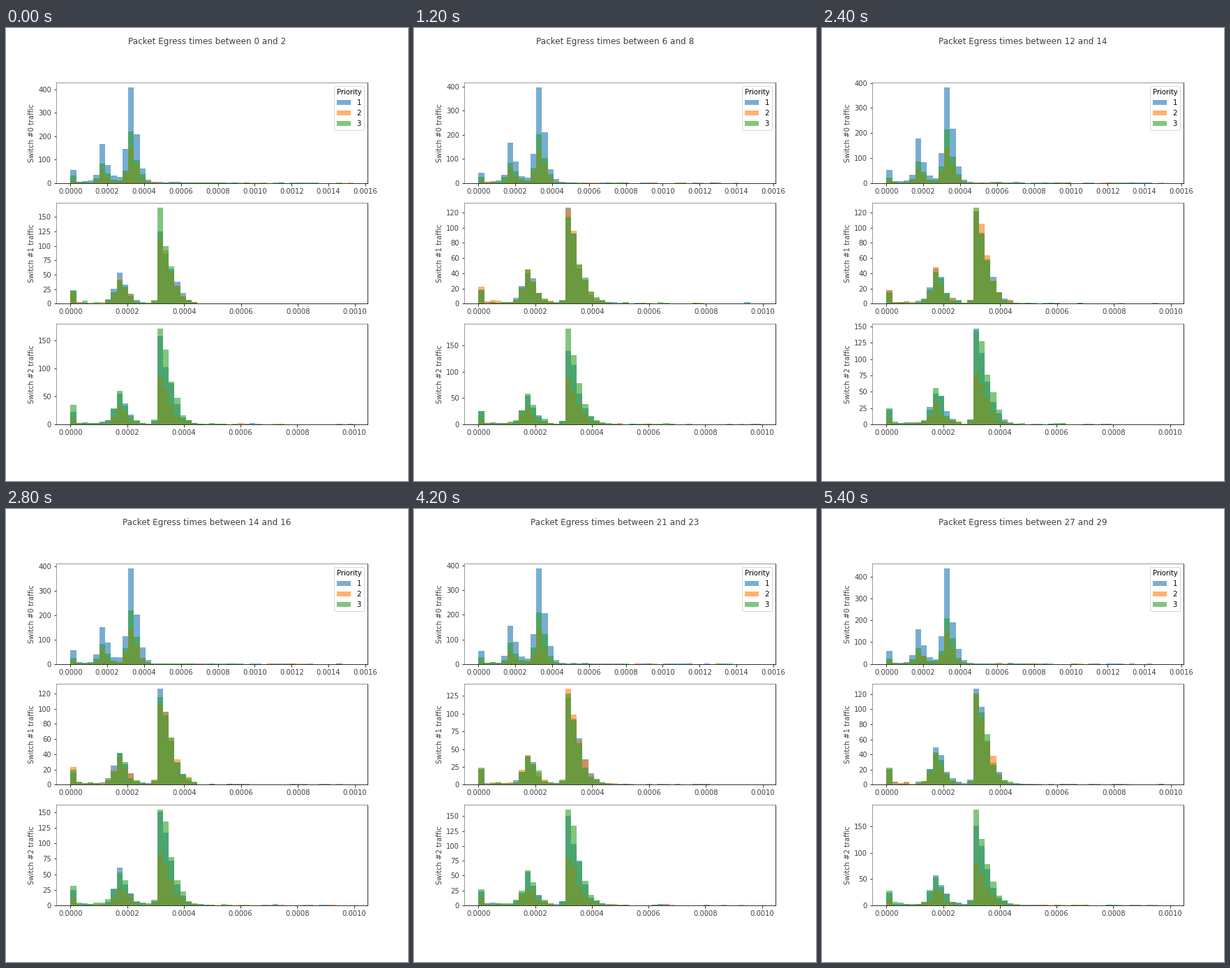
Recreate the animation shown at these times as a matplotlib script. Size 576x648 px, loop 5.6 s.

```python
import numpy as np
import matplotlib.pyplot as plt
from matplotlib.animation import FuncAnimation

INK, SOFT = "#404040", "#808080"
plt.rcParams.update({
    "font.family": "DejaVu Sans",
    "font.size": 10,
    "figure.subplot.bottom": 0.125,
    "text.color": INK,
    "axes.labelcolor": INK,
    "xtick.labelcolor": INK,
    "ytick.labelcolor": INK,
})

STEPS, INTERVAL, BINS = 28, 200, 49
COLORS = ("#1f77b4", "#ff7f0e", "#2ca02c")

# Per switch: longest delay, and packets per priority in the idle bin and in
# two humps given as (peak bin, rise, fall, heights). "busiest" holds the
# tallest bar at the steps in KEY_STEPS.
KEY_STEPS = (0, 4, 8, 12, 17, 21, 27)
SWITCHES = [
    dict(limit=0.001536, idle=(50, 10, 26),
         first=(5, 0.74, 1.3, (156, 50, 82)),
         main=(10, 0.88, 1.3, (404, 138, 206)),
         busiest=(410, 405, 390, 383, 408, 390, 438)),
    dict(limit=0.0009954, idle=(20, 19, 21),
         first=(8, 1.15, 1.8, (45, 40, 42)),
         main=(15, 0.45, 2.4, (121, 119, 122)),
         busiest=(166, 132, 120, 126, 125, 135, 127)),
    dict(limit=0.000999, idle=(25, 11, 29),
         first=(8, 1.15, 1.8, (53, 31, 53)),
         main=(15, 0.45, 2.3, (147, 85, 170)),
         busiest=(171, 183, 180, 144, 168, 161, 182)),
]


def hump(peak, rise, fall, heights):
    d = np.arange(BINS) - peak
    shape = np.exp(-(np.abs(d) / np.where(d < 0, rise, fall)) ** 1.5)
    return np.outer(heights, shape)


def mean_counts(switch):
    """Expected packets per window, by priority and bin."""
    decay = np.exp(-np.arange(BINS) / 14)
    tail = np.outer(switch["main"][3], 0.02 * decay)
    mean = hump(*switch["first"]) + hump(*switch["main"]) + tail
    mean[:, 0] = switch["idle"]
    return mean


def simulate(switch, rng):
    """Packets in overlapping two-second windows, one window per step."""
    mean = mean_counts(switch) / 2
    raw = rng.poisson(mean, (STEPS + 1,) + mean.shape)
    seconds = np.rint(mean + 0.6 * (raw - mean))
    windows = seconds[:-1] + seconds[1:]
    tops = np.interp(np.arange(STEPS), KEY_STEPS, switch["busiest"])
    for window, top in zip(windows, tops.round()):
        column = window[:, switch["main"][0]]
        column[column.argmax()] = top
    return windows


rng = np.random.default_rng(4)
counts = [simulate(switch, rng) for switch in SWITCHES]

fig, axes = plt.subplots(3, 1, figsize=(8, 9), dpi=72)
title = fig.suptitle("")
bars = []
for i, (ax, switch) in enumerate(zip(axes, SWITCHES)):
    limit = switch["limit"]
    edges = np.linspace(0, limit, BINS + 1)
    bars.append([
        ax.bar(edges[:-1], np.ones(BINS), np.diff(edges), align="edge",
               color=color, alpha=0.6, label=str(p + 1))
        for p, color in enumerate(COLORS)])
    ax.set_xlim(-0.05 * limit, 1.05 * limit)
    ax.set_ylabel(f"Switch #{i} traffic")
    ax.spines[["top", "left"]].set_color(SOFT)
legend = axes[0].legend(title="Priority", loc="upper right",
                        labelcolor="black")
legend.get_title().set_color("black")


def update(step):
    title.set_text(f"Packet Egress times between {step} and {step + 2}")
    for ax, groups, windows in zip(axes, bars, counts):
        for group, heights in zip(groups, windows[step]):
            for bar, height in zip(group, heights):
                bar.set_height(height)
        ax.set_ylim(0, 1.05 * windows[step].max())


anim = FuncAnimation(fig, update, frames=STEPS, init_func=lambda: None,
                     interval=INTERVAL, repeat=True, repeat_delay=0)
plt.show()
```
